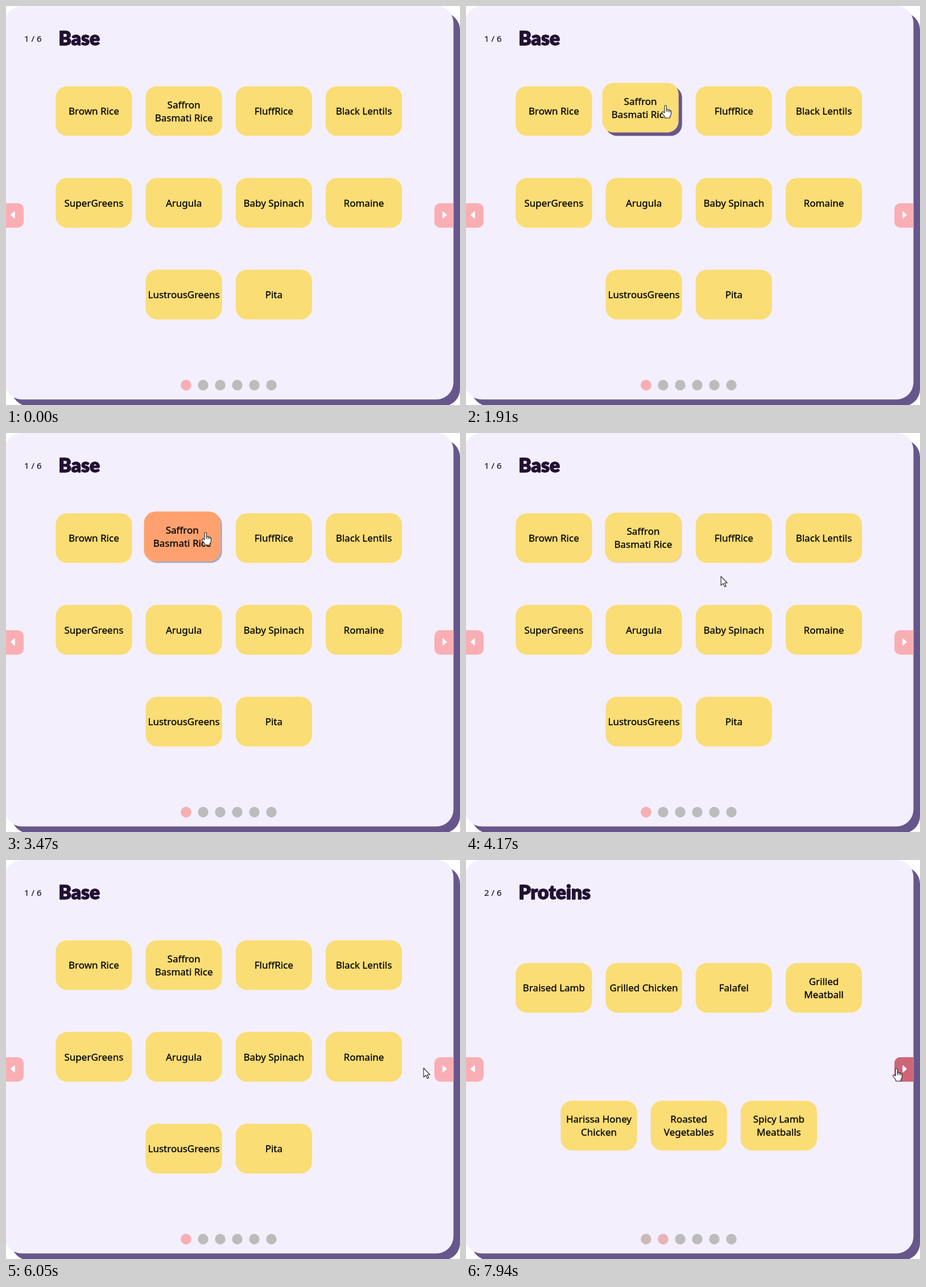
Recreate the animation shown at these times as an HTML page with a canvas. Size 798x702 px, loop 8 s.

```html
<!DOCTYPE html>
<html lang="en">
<head>
<meta charset="utf-8">
<title>Bowl builder</title>
<style>
  html, body { margin: 0; height: 100%; overflow: hidden; background: #fff; }
  canvas { display: block; }
</style>
</head>
<body>
<canvas id="stage" width="798" height="702"></canvas>
<script>
const ctx = document.getElementById('stage').getContext('2d');
const LOOP = 8000, TRANSITION = 400, PAGE_SWITCH = 7740;
const INK = '#221133', YELLOW = '#fadd75', ORANGE = '#fea16f', PINK = '#f9aeb4';
const ROSE = '#cd6577', GREY = '#bcbcbc', PURPLE = '#67568c', LILAC = '#f3effd';
const CARD_W = 134.2, CARD_H = 87.4, PITCH = 158.2, CENTER = 391.7;

const pages = [
  { title: 'Base', top: 141.2, gap: 161.4, rows: [
    ['Brown Rice', 'Saffron\nBasmati Rice', 'FluffRice', 'Black Lentils'],
    ['SuperGreens', 'Arugula', 'Baby Spinach', 'Romaine'],
    ['LustrousGreens', 'Pita']] },
  { title: 'Proteins', top: 181.2, gap: 242.3, rows: [
    ['Braised Lamb', 'Grilled Chicken', 'Falafel', 'Grilled\nMeatball'],
    ['Harissa Honey\nChicken', 'Roasted\nVegetables', 'Spicy Lamb\nMeatballs']] },
];

// Times at which a state flips on, off, on, ...
const lifted = {
  'Saffron\nBasmati Rice': [1400, 2280, 2660, 3350, 3540, 3950],
  'Romaine': [5205, 5480],
};
const selected = { 'Saffron\nBasmati Rice': [2480, 3560] };
const arrowHovered = [6940];

// Cursor stops: time, x, y.
const stops = [
  [230, 530, -6], [1010, 367, 122], [1900, 351, 175], [3860, 351, 175], [4170, 448, 252],
  [5200, 624, 303], [5350, 684, 331], [6050, 734, 366], [7050, 757, 367]];

const clamp = k => Math.min(1, Math.max(0, k));
const easeOut = k => 1 - (1 - clamp(k)) ** 2;

// Eased 0..1 value of a state; each flip starts from wherever the last one got to.
function transition(flips = [], t) {
  return flips.reduce((value, flip, i) => {
    const until = Math.min(t, flips[i + 1] ?? t);
    const goal = i % 2 ? 0 : 1;
    return value + (goal - value) * easeOut((until - flip) / TRANSITION);
  }, 0);
}

function cursorAt(t) {
  const next = stops.findIndex(stop => stop[0] > t);
  if (next < 0) return stops.at(-1).slice(1);
  const [t0, x0, y0] = stops[next - 1], [t1, x1, y1] = stops[next];
  const k = (t - t0) / (t1 - t0);
  return [x0 + (x1 - x0) * k, y0 + (y1 - y0) * k];
}

function box(x, y, w, h, radius, color, alpha = 1) {
  ctx.globalAlpha = alpha;
  ctx.fillStyle = color;
  ctx.beginPath();
  ctx.roundRect(x, y, w, h, radius);
  ctx.fill();
  ctx.globalAlpha = 1;
}

function text(str, x, y, font, color, weight, align = 'left') {
  ctx.font = font;
  ctx.textAlign = align;
  ctx.fillStyle = ctx.strokeStyle = color;
  ctx.lineWidth = weight;
  ctx.lineJoin = 'round';
  ctx.fillText(str, x, y);
  ctx.strokeText(str, x, y);
}

function card(label, x, y, t) {
  const lift = transition(lifted[label], t);
  box(x, y, CARD_W, CARD_H, 20, PURPLE, lift);
  x -= 6 * lift;
  y -= 6 * lift;
  box(x, y, CARD_W, CARD_H, 20, YELLOW);
  box(x, y, CARD_W, CARD_H, 20, ORANGE, transition(selected[label], t));
  const lines = label.split('\n');
  lines.forEach((line, i) => text(line, x + CARD_W / 2,
    y + CARD_H / 2 + 6.4 + 23 * (i - (lines.length - 1) / 2),
    '17px "Noto Sans", sans-serif', '#000', .3, 'center'));
}

function arrowButton(x, radius, tipX, backX, hover) {
  box(x, 347, 33.5, 43, radius, PINK);
  box(x, 347, 33.5, 43, radius, ROSE, hover);
  ctx.fillStyle = ctx.strokeStyle = '#fff';
  ctx.lineWidth = 1.5;
  ctx.beginPath();
  ctx.moveTo(tipX, 367.5);
  ctx.lineTo(backX, 362);
  ctx.lineTo(backX, 373);
  ctx.closePath();
  ctx.fill();
  ctx.stroke();
}

const pointerShape = new Path2D('M0 0V16L4 12.5 6.5 18.5 9 17.5 6.5 11.7H11Z');
const handShape = new Path2D('M-2 12V1.5Q-2 0-.3 0T1.4 1.5V7.5Q3 6.3 4.3 8 6 7 7 8.7 9.3 8 9.5 10.5V15' +
  'Q9 18 7.5 19.5V22H-1.5V20Q-3.5 17-6.5 13.5-7 11.5-5 11-3.5 11-2 13Z');
const knuckles = new Path2D('M1.4 7.5V11.5M4.3 8.5V11.5M7 9V12');

function cursor(t) {
  if (t < stops[0][0]) return;
  const [x, y] = cursorAt(t);
  const over = (left, top, w, h) => x >= left && x < left + w && y >= top && y < top + h;
  const isHand = over(245, 141, CARD_W, CARD_H) || over(562, 302.6, CARD_W, CARD_H) || over(753, 347, 33, 43);
  const shape = isHand ? handShape : pointerShape;
  ctx.save();
  ctx.translate(x, y);
  ctx.fillStyle = '#fff';
  ctx.strokeStyle = '#222';
  ctx.lineWidth = 1.1;
  ctx.fill(shape);
  ctx.stroke(shape);
  if (isHand) ctx.stroke(knuckles);
  ctx.restore();
}

function draw(t) {
  const pageIndex = t < PAGE_SWITCH ? 0 : 1;
  const page = pages[pageIndex];
  ctx.clearRect(0, 0, 798, 702);
  box(10, 12, 788, 692, 30, PURPLE);
  box(-2, 0, 788.5, 692.3, 30, LILAC);

  text(`${pageIndex + 1} / 6`, 32, 63, '15px "Noto Sans", sans-serif', INK, .2);
  text(page.title, 92.5, 68.5, '900 33.5px Lato, sans-serif', INK, 1.4);

  page.rows.forEach((row, r) => {
    const left = CENTER - ((row.length - 1) * PITCH + CARD_W) / 2;
    row.forEach((label, c) => card(label, left + c * PITCH, page.top + r * page.gap, t));
  });

  arrowButton(-2.5, [0, 10, 10, 0], 8.8, 15, 0);
  arrowButton(753, [10, 0, 0, 10], 774.2, 768, transition(arrowHovered, t));

  const turned = transition([PAGE_SWITCH], t);
  for (let i = 0; i < 6; i++) {
    const active = [1 - turned, turned][i] ?? 0;
    box(307.3 + i * 30, 657.8, 18.4, 18.4, 9.2, GREY);
    box(307.3 + i * 30, 657.8, 18.4, 18.4, 9.2, PINK, active);
  }
  cursor(t);
}

const start = performance.now();
function tick() {
  draw((performance.now() - start) % LOOP);
  requestAnimationFrame(tick);
}
tick();
</script>
</body>
</html>
```
